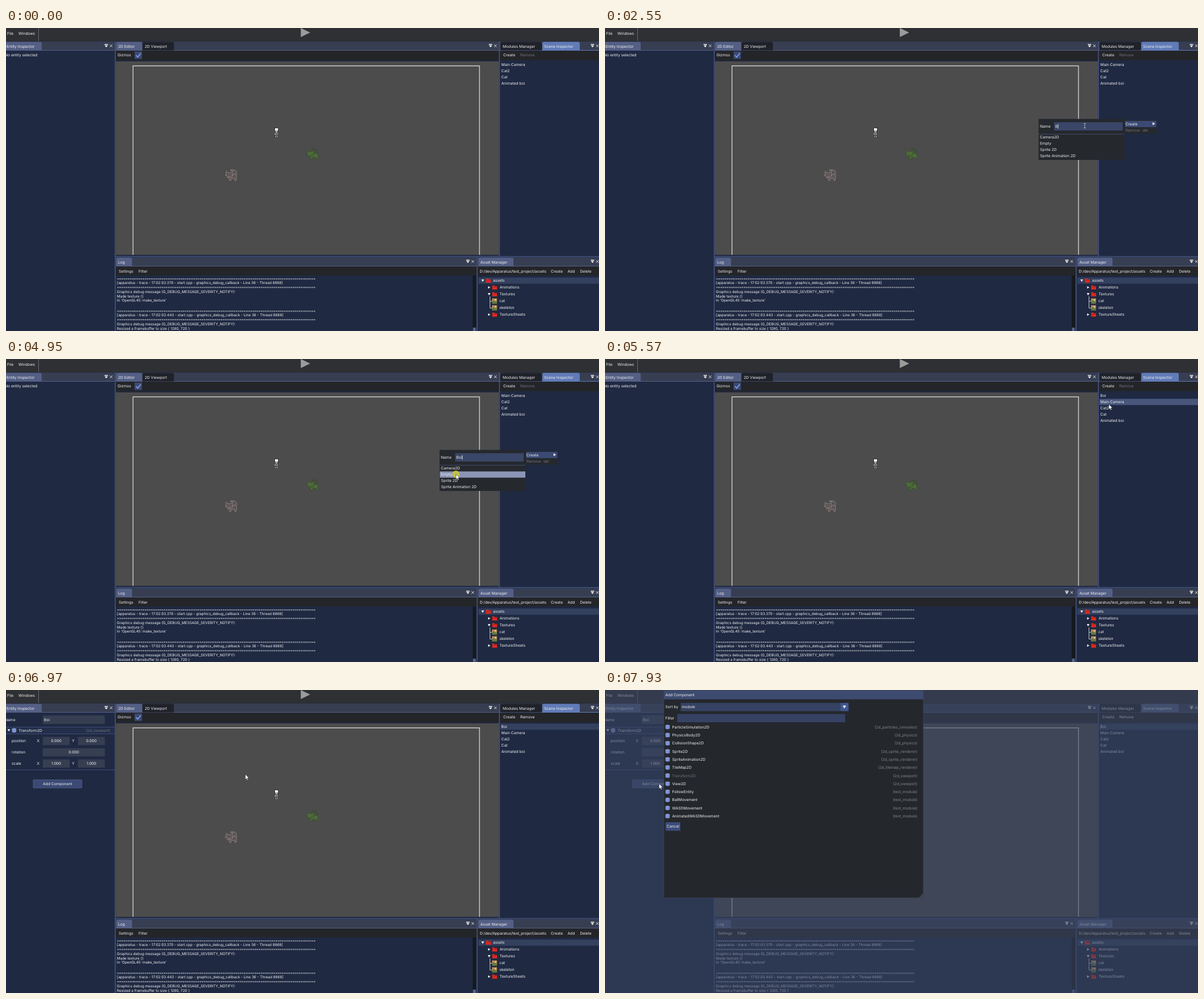
Write an HTML page that moves like this. It is 1047 px wide and 535 px high and loops after 8 s.

```html
<!DOCTYPE html>
<html lang="en">
<head>
<meta charset="utf-8">
<title>Editor</title>
<style>
  html, body { margin: 0; width: 100%; height: 100%; overflow: hidden; background: #1f2942; }
  svg { display: block; width: 1047px; height: 535px; }
  text { font-family: Inter, "Open Sans", sans-serif; font-size: 6.7px; text-rendering: geometricPrecision; white-space: pre; }
  .log text { font-size: 6.4px; }
  .log .rule { letter-spacing: -.5px; }
</style>
</head>
<body>
<svg id="stage" viewBox="0 0 1047 535"></svg>
<script>
const LOOP = 8000;
const C = {
  navy: '#1f2942', bar: '#242529', title: '#373e52', tab: '#545f85', focus: '#617bb7', dark: '#20222a',
  line: '#45547f', white: '#f2f2f2', grey: '#72757c', field: '#363e52', input: '#3a4667', popup: '#25282d',
  hover: '#48567c', active: '#8b95b6', picked: '#33405e', button: '#3b4a74', red: '#e0291f'
};

// Markup helpers
const rect = (x, y, w, h, fill, more = '') => `<rect x="${x}" y="${y}" width="${w}" height="${h}" fill="${fill}" ${more}/>`;
const path = (d, fill, more = '') => `<path d="${d}" fill="${fill}" ${more}/>`;
const text = (x, mid, str, fill = C.white, anchor = 'start', more = '') =>
  `<text x="${x}" y="${mid + 2.4}" fill="${fill}" text-anchor="${anchor}" ${more}>${str}</text>`;
const group = (id, body, more = '') => `<g id="${id}" ${more}>${body}</g>`;
const down = (x, y, r = 2.4) => path(`M${x - r} ${y - r * .8}h${r * 2}l${-r} ${r * 1.7}z`, C.white);
const right = (x, y, r = 2.2) => path(`M${x - r * .8} ${y - r}v${r * 2}l${r * 1.8} ${-r}z`, C.white);
const tab = (x, y, w, label, fill, tx, id = '') =>
  path(`M${x} ${y + 15}v-12q0 -3 3 -3h${w - 6}q3 0 3 3v12z`, fill, id && `id="${id}"`) + text(tx, y + 7.7, label);
const panelButtons = (x, y) =>
  rect(x - 3, y - 3.2, 6, 1.5, C.white) + path(`M${x - 2.8} ${y - .8}h5.6l-2.8 3.6z`, C.white) +
  path(`M${x + 6.4} ${y - 2.2}l4.4 4.4m0 -4.4l-4.4 4.4`, 'none', `stroke="${C.white}" stroke-width=".9"`);
const folder = (x, y) => path(`M${x} ${y - 3.5}h3.5l1 1.2h4v6h-8.5z`, C.red) + rect(x + 1, y - 1.2, 7.5, .7, '#8f1c18');
const picture = (x, y) => rect(x, y - 4.5, 9, 9, '#b98a52') + path(`M${x} ${y + 4.5}v-3l3 -3l3 3l1.5 -1.5l1.5 1.5v3z`, '#5f7a45') +
  rect(x + 5, y - 3, 2, 2, '#e6d9a8');
const drum = (x, y) => path(`M${x} ${y - 2.8}q3.8 -2.4 7.6 0v5.6q-3.8 2.4 -7.6 0z`, '#7d93cf') +
  path(`M${x} ${y - 2.6}q3.8 2 7.6 0`, 'none', 'stroke="#9badde" stroke-width=".5"');

function cat(x, y, fill, stroke) {
  const body = path('M12 10h6l2 3v5l-1 4h-2v-4h-6l-1 4h-2l-1 -4l-3 -2z', fill) +
    path('M19.5 12c2 -5 1 -10 -5 -10.5h-5v1.5h5c3 1 4 4 2.5 7', 'none') +
    path('M1 12l1 -8l3 3h5l3 -3l.5 8l-2.5 4h-7z', fill) +
    path('M4.5 10.5h1m4 0h1M5.5 13.5l2 1l2 -1M0 12h3m8 0h3', 'none');
  return `<g transform="translate(${x} ${y}) scale(1 .92)" stroke="${stroke}" stroke-width=".9">${body}</g>`;
}

function skeleton() {
  return rect(474.3, 176.3, 6.6, 7, '#26282c') + rect(475, 177, 5.2, 4.2, '#fff') + rect(475.4, 181.4, 4.4, 1.6, '#b9b9b9') +
    rect(474.2, 184, 6.4, 8.8, '#303236') + rect(476, 183.6, 3, 1.2, '#ddd') + rect(474.6, 185, 1.1, 4, '#c4c4c4') +
    rect(479, 185, 1.1, 4, '#9c9c9c') + rect(476.4, 186, 2.2, 1, '#ccc') + rect(476.4, 188, 2.2, 1, '#bbb') +
    rect(475.6, 190, 1.2, 2.8, '#c8c8c8') + rect(478.4, 190, 1.2, 2.8, '#c8c8c8');
}

function frameParts() {
  return rect(0, 0, 1047, 535, C.navy) + rect(0, 0, 1047, 23.5, '#2f3034') + rect(57, 0, 1, 23, '#666a75') +
    text(2, 9.5, 'File') + text(22, 9.5, 'Windows') + path('M520.5 0v16l16.5 -8z', '#9b9b9b') +
    rect(0, 24, 1047, 15, C.title) + rect(0, 39, 192, 1, C.tab, 'id="entityLine"') +
    rect(194, 39, 677, 1, C.tab) + rect(872, 39, 175, 1, C.focus, 'id="sceneLine"') +
    tab(-4, 24.5, 67, 'Entity Inspector', C.tab, 1, 'entityTab') + panelButtons(177, 31.5) +
    tab(194.5, 24.5, 46, '2D Editor', C.tab, 198) + tab(241, 24.5, 55.5, '2D Viewport', C.dark, 245) + panelButtons(855.5, 31.5) +
    tab(873, 24.5, 73, 'Modules Manager', C.dark, 877) + tab(947, 24.5, 66, 'Scene Inspector', C.focus, 950, 'sceneTab') + panelButtons(1035.5, 31.5) +
    rect(194, 40, 677, 17, C.bar) + text(197, 48, 'Gizmos') + rect(227, 41.5, 13, 13, C.button) +
    path('M229.5 48l3 3.5l5.5 -7', 'none', 'stroke="#7d9ae0" stroke-width="1.9"') +
    rect(872, 40, 175, 17, C.bar) + text(878, 48, 'Create') + text(908, 48, 'Remove', C.grey, 'start', 'id="remove"');
}

function viewParts() {
  return rect(194, 59, 676, 341.5, '#4c4c4c') +
    path('M224.3 400.5V66.9H836V400.5', 'none', 'stroke="#e4e4e4" stroke-width="1.2"') +
    skeleton() + cat(387, 249, '#5d5555', '#978686') + cat(530.5, 211.8, '#4f6d3a', '#364d28');
}

function logParts() {
  const rule = '='.repeat(94);
  const head = ms => `[apparatus - trace - 17:02:03.${ms} - start.cpp - graphics_debug_callback - Line 36 - Thread 8868]`;
  const note = 'Graphics debug message (G_DEBUG_MESSAGE_SEVERITY_NOTIFY):';
  const lines = [rule, head('370'), rule, note, 'Made texture {}', "In 'OpenGL45::make_texture'", '',
    rule, head('443'), rule, note, 'Resized a framebuffer to size { 1280, 720 }'];
  const body = lines.map((s, i) =>
    text(195.8, 442.2 + i * 7.75 + (i > 6 ? 2.8 : 0), s, C.white, 'start', s === rule ? 'class="rule"' : '')).join('');
  return rect(194, 405, 637, 15, C.title) + rect(194, 420, 637, 1, C.tab) + tab(194.5, 405.5, 28, 'Log', C.tab, 198) +
    panelButtons(815.5, 412.3) + rect(194, 421, 637, 16, C.bar) + text(199, 429.3, 'Settings') + text(234, 429.3, 'Filter') +
    `<g class="log">${body}</g>` + rect(824, 437, 6, 98, '#16191f') + rect(824.5, 529, 5, 6, '#56658f');
}

function assetParts() {
  return rect(833, 405, 214, 15, C.title) + rect(833, 420, 214, 1, C.tab) + tab(834, 405.5, 62, 'Asset Manager', C.tab, 837.5) +
    panelButtons(1035.5, 412.3) + rect(833, 421, 214, 16, C.bar) + text(836.5, 429.3, 'D:/dev/Apparatus/test_project/assets') +
    text(962, 429.3, 'Create') + text(991.5, 429.3, 'Add') + text(1013.5, 429.3, 'Delete') +
    rect(834, 440.5, 213, 11, C.picked) + down(841.7, 446) + folder(847.5, 446) + text(860, 446, 'assets') +
    right(853, 458) + folder(858.5, 458) + text(871.5, 458, 'Animations') +
    down(853, 470) + folder(858.5, 470) + text(871.5, 470, 'Textures') +
    path('M854.5 474V494.5H858M854.5 482.5H858', 'none', 'stroke="#dcdcdc" stroke-width=".9"') +
    picture(858, 482) + text(871, 482, 'cat') + picture(858, 494) + text(871, 494, 'skeleton') +
    right(853, 506) + folder(858.5, 506) + text(871.5, 506, 'TextureSheets');
}

const splitters = () => rect(192, 24, 1.6, 511, C.line) + rect(870.4, 24, 1.6, 380, C.line) +
  rect(193, 402.8, 854, 1.6, C.line) + rect(831, 404, 1.6, 131, C.line);

function sceneList() {
  const names = ['Main Camera', 'Cat2', 'Cat', 'Animated boi'];
  return rect(873, 59.3, 174, 11, C.hover, 'id="rowMark"') + text(874.5, 65, 'Boi', C.white, 'start', 'id="boi"') +
    group('entities', names.map((s, i) => text(874.5, 65 + i * 11, s)).join(''));
}

function inspector() {
  const box = (x, mid, w, label) => rect(x, mid - 7.2, w, 14.4, C.field, 'rx="1"') + text(x + w / 2, mid, label, C.white, 'middle');
  const pair = (label, mid, value) => text(10, mid, label) + text(54.5, mid, 'X') + box(65, mid, 47.5, value) +
    text(116.5, mid, 'Y') + box(127, mid, 47.5, value);
  return text(-2, 52.5, 'Name') + rect(65, 45, 109.5, 15, C.field, 'rx="1"') + text(67, 52.5, 'Boi') +
    rect(0, 65, 192, 12.5, '#232e4a') + rect(0, 65, 192, .8, C.line) + rect(0, 77, 192, .8, C.line) +
    down(5, 71.2) + drum(10.5, 71.2) + text(22.5, 71.2, 'Transform2D') + text(184, 71.2, '(2d_viewport)', C.grey, 'end') +
    pair('position', 90, '0.000') + text(10, 110, 'rotation') + box(65, 110, 109.5, '0.000') + pair('scale', 129.7, '1.000') +
    rect(0, 140.5, 192, .9, C.line) + rect(48, 158.5, 86, 14.5, C.button, 'id="addButton" rx="1" stroke="#5a6892" stroke-width=".6"') +
    text(91, 166, 'Add Component', C.white, 'middle');
}

function menus() {
  const kinds = ['Camera2D', 'Empty', 'Sprite 2D', 'Sprite Animation 2D'];
  const context = rect(917.5, 163, 57, 23.5, C.popup) + rect(918, 164, 55.5, 11, C.button, 'id="createMark"') +
    text(919, 169.3, 'Create') + right(968.8, 169, 2.6) + text(919, 180.3, 'Remove', C.grey) + text(949, 180.3, 'del', C.grey);
  const sub = rect(765.5, 160.5, 152, 72.5, C.popup) + text(768, 173.7, 'Name') + rect(793, 166.3, 121, 14.7, C.input) +
    text(795, 173.7, '', C.white, 'start', 'id="typed"') + rect(795.3, 169.8, .8, 8, C.white, 'id="caret"') +
    rect(766, 187, 151, .8, C.line) + rect(766, 187.5, 151, 11, C.hover, 'id="kindMark"') +
    group('kinds', kinds.map((s, i) => text(768, 192.3 + i * 11, s, 'inherit')).join(''));
  return group('context', context) + group('sub', sub);
}

function modal() {
  const rows = [
    ['ParticleSimulation2D', '2d_particles_simulator'], ['PhysicsBody2D', '2d_physics'], ['CollisionShape2D', '2d_physics'],
    ['Sprite2D', '2d_sprite_renderer'], ['SpriteAnimation2D', '2d_sprite_renderer'], ['TileMap2D', '2d_tilemap_renderer'],
    ['Transform2D', '2d_viewport'], ['View2D', '2d_viewport'], ['FollowEntity', 'test_module'],
    ['BallMovement', 'test_module'], ['WASDMovement', 'test_module'], ['AnimatedWASDMovement', 'test_module']
  ];
  const list = rows.map(([name, from], i) => {
    const mid = 65.3 + i * 14.3;
    return drum(106.7, mid) + text(118.5, mid, name, i === 6 ? C.grey : C.white) + text(551.5, mid, `(${from})`, '#85878c', 'end');
  }).join('');
  return rect(104, 1, 458, 366, '#24272c', 'stroke="#3d4862" stroke-width=".6"') + rect(104, 1, 458, 15.5, '#3d4b70') +
    text(106.5, 8.7, 'Add Component') + text(106.5, 30, 'Sort by') + rect(133.5, 22.8, 282, 14.5, '#364263') +
    text(135.5, 30, 'module') + rect(415.5, 22.8, 14.5, 14.5, '#3f568f') + down(422.7, 30, 3.1) +
    text(106.5, 50, 'Filter') + rect(127.5, 42.3, 296.5, 14.7, '#364263') + list +
    rect(107, 233.5, 26, 15, '#3c4d7a', 'rx="1"') + text(120, 241, 'Cancel', C.white, 'middle') +
    path('M561.5 359v7.5h-7.5z', '#414754');
}

const pointer = group('pointer',
  `<circle id="press" r="6.5" fill="#cdc832" opacity=".85"/>` +
  path('M0 0V9L2.1 7.2L3.5 10.2L5 9.5L3.6 6.6H6.6Z', '#fff', 'id="arrow" stroke="#15181f" stroke-width=".5"') +
  path('M-2 -4h1.5l.5 .5l.5 -.5h1.5M0 -3.5v7M-2 4h1.5l.5 -.5l.5 .5h1.5', 'none', 'id="beam" stroke="#c9cacc" stroke-width=".8"'));

document.getElementById('stage').innerHTML = frameParts() + viewParts() + logParts() + assetParts() + splitters() +
  sceneList() + group('inspector', inspector()) + text(-2, 48, 'No entity selected', C.white, 'start', 'id="nothing"') +
  menus() + rect(0, 0, 1047, 535, '#384460', 'id="dim"') + group('modal', modal()) + pointer;

const el = id => document.getElementById(id);
const show = (id, on) => { el(id).style.display = on ? '' : 'none'; };
const paint = (id, fill) => el(id).setAttribute('fill', fill);
const within = (t, a, b) => t >= a && t < b;

// Pointer moves: first step, last step, number of steps, x, y
const moves = [
  [220, 220, 1, 990, 436], [300, 600, 5, 915.5, 161.5], [910, 910, 1, 919, 166], [1070, 1070, 1, 927, 168],
  [1310, 1610, 5, 847, 172.5], [3630, 3630, 1, 844.5, 176], [3720, 3720, 1, 842.5, 176.5], [3950, 4030, 2, 808, 176],
  [4340, 4650, 5, 794.5, 203.5], [5190, 5570, 6, 889.5, 80], [5660, 5970, 5, 889.5, 73], [6040, 6040, 1, 888.5, 68],
  [6190, 6280, 2, 887.5, 64.8], [6660, 7100, 6, 190, 191], [7180, 7390, 4, 96.5, 165.5], [7470, 7470, 1, 95.5, 165.5]
];
const presses = [[675, 750], [1610, 1760], [4950, 5190], [6430, 6660], [7640, 7850]];

function pointerAt(t) {
  let x = 990, y = 436;
  for (const [from, to, n, nx, ny] of moves) {
    if (t < from) break;
    const step = to > from ? Math.floor((t - from) / (to - from) * (n - 1) + 1e-6) + 1 : n;
    const p = Math.min(1, step / n);
    x += (nx - x) * p;
    y += (ny - y) * p;
  }
  return [x, y];
}

function draw(t) {
  const [x, y] = pointerAt(t);
  const subOpen = within(t, 990, 5040);
  const made = t >= 5040, picked = t >= 6510, asking = t >= 7770;

  // Pointer
  const beam = subOpen && x > 793 && x < 914 && y < 181;
  show('pointer', t >= 220);
  el('pointer').setAttribute('transform', `translate(${x} ${y})`);
  show('beam', beam);
  show('arrow', !beam);
  show('press', presses.some(([a, b]) => within(t, a, b)));

  // Context menu
  show('context', within(t, 910, 5040));
  show('createMark', subOpen);
  show('sub', subOpen);
  const word = 'Boi'.slice(0, (t >= 2550) + (t >= 2790) + (t >= 2880));
  el('typed').textContent = word;
  show('caret', t >= 1610);
  if (subOpen) el('caret').setAttribute('x', 795.3 + el('typed').getComputedTextLength());
  paint('kinds', word ? C.white : C.grey);
  const kind = Math.floor((y - 187.5) / 11);
  show('kindMark', subOpen && kind >= 0);
  el('kindMark').setAttribute('y', 187.5 + kind * 11);
  paint('kindMark', t >= 4950 ? C.active : C.hover);

  // Scene list
  show('boi', made);
  el('entities').setAttribute('transform', `translate(0 ${made ? 11 : 0})`);
  const over = made && x > 873 && y > 59 && y < 114;
  const row = over ? Math.floor((y - 59.3) / 11) : 0;
  show('rowMark', over || picked);
  el('rowMark').setAttribute('y', 59.3 + row * 11);
  paint('rowMark', within(t, 6430, 6510) ? C.active : over ? C.hover : C.picked);
  paint('remove', picked ? C.white : C.grey);

  // Inspector and dialog
  show('nothing', !picked);
  show('inspector', picked);
  const onButton = x > 48 && x < 134 && y > 158 && y < 173;
  paint('addButton', asking || !onButton ? C.button : t >= 7640 ? C.active : '#5a699a');
  for (const part of ['Tab', 'Line']) {
    paint('entity' + part, within(t, 7640, 7770) ? C.focus : C.tab);
    paint('scene' + part, t < 7640 ? C.focus : C.tab);
  }
  show('modal', asking);
  el('dim').setAttribute('opacity', .6 * (t >= 7930 ? 1 : t >= 7850 ? .8 : asking ? .4 : 0));
}

const start = performance.now();
(function tick() {
  draw((performance.now() - start) % LOOP);
  requestAnimationFrame(tick);
})();
</script>
</body>
</html>
```
